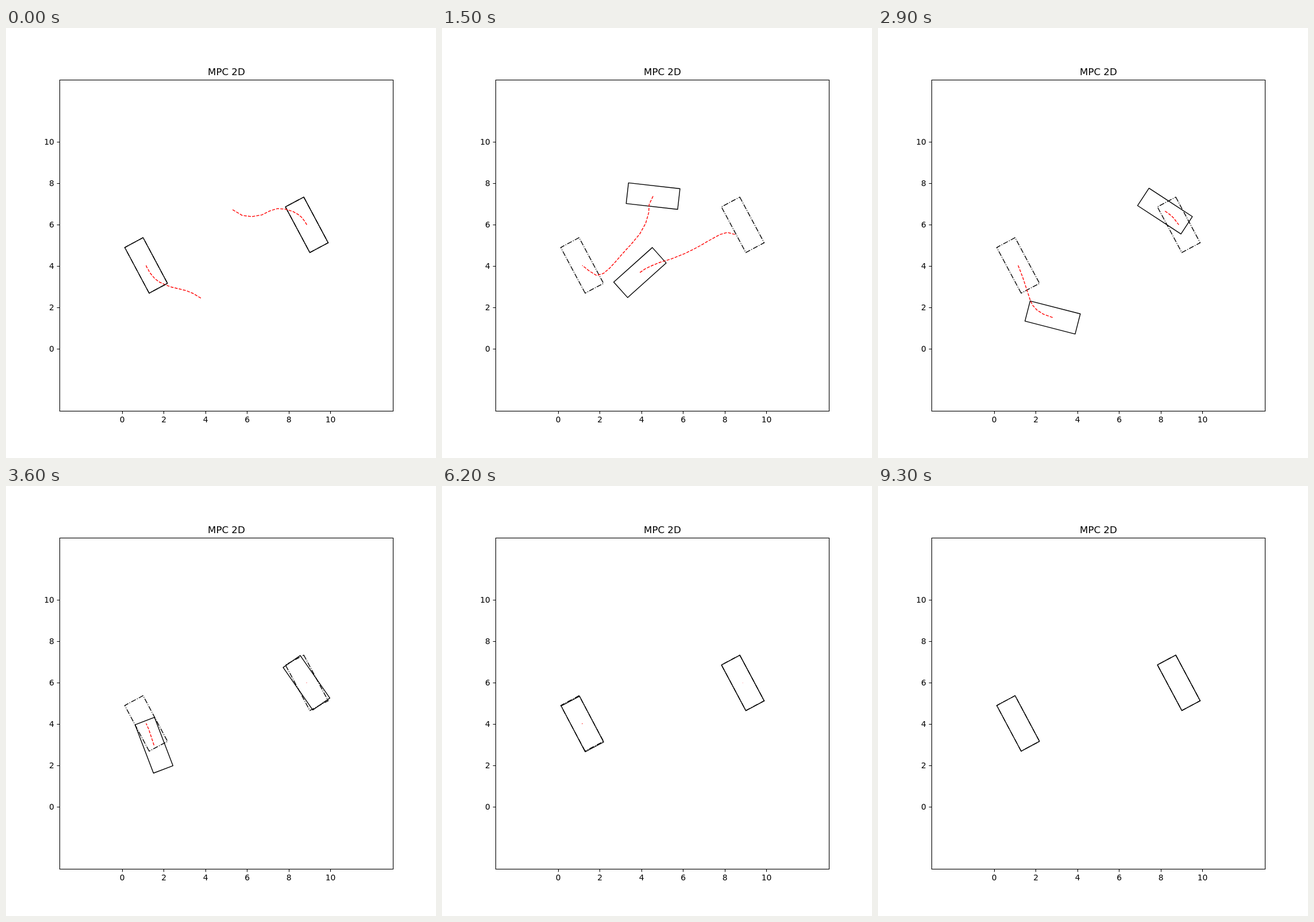
Animation of 748 by 748 pixels, one loop 10000 ms. Source, as an HTML page:

```html
<!DOCTYPE html>
<html lang="en">
<head>
<meta charset="utf-8">
<title>MPC 2D</title>
<style>
  html, body { margin: 0; width: 100%; height: 100%; overflow: hidden; background: #fff; }
  svg { display: block; width: 100vw; height: 100vh; }
  text { font: 13.89px "DejaVu Sans", sans-serif; fill: #000; text-anchor: middle; }
  .title { font-size: 16.67px; }
  .y { text-anchor: end; }
  .axis { fill: none; stroke: #000; stroke-width: 1.11; }
  .car, .goal, .plan { fill: none; stroke: #000; stroke-width: 1.39; stroke-linejoin: round; }
  .goal { stroke-dasharray: 8.89 2.22 1.39 2.22; }
  .plan { stroke: #f00; stroke-dasharray: 5.14 2.22; }
</style>
</head>
<body>
<svg viewBox="0 0 748 748">
  <text class="title" x="383.4" y="82">MPC 2D</text>
  <g id="ticks"></g>
  <rect class="axis" x="93.5" y="90.5" width="580" height="576"/>
  <g id="scene"></g>
</svg>
<script>
const STEP = 100, LOOP = 10000, N = 13;
const LENGTH = 90.1, WIDTH = 36.2;
const RAD = Math.PI / 180;

const add = (parent, tag, attrs, text = '') => {
  const el = document.createElementNS('http://www.w3.org/2000/svg', tag);
  for (const name in attrs) el.setAttribute(name, attrs[name]);
  el.textContent = text;
  return document.getElementById(parent).appendChild(el);
};
const mix = (a, b, u) => a + (b - a) * u;
const points = text => text.split(' ').map(pair => pair.split(',').map(Number));
const line = pts => 'M' + pts.map(p => p[0].toFixed(2) + ' ' + p[1].toFixed(2)).join('L');

function box({ x, y, a }) {
  const c = Math.cos(a * RAD), s = Math.sin(a * RAD);
  const corners = [[-1, -1], [1, -1], [1, 1], [-1, 1]].map(([i, j]) => {
    const l = i * LENGTH / 2, w = j * WIDTH / 2;
    return [x + l * c - w * s, y + l * s + w * c];
  });
  return line(corners) + 'Z';
}

// Waypoints: step, x, y, heading, speed per step, or a decay rate towards the next one.
// Plans: predicted path at a given step; from `follow` on, the plan is the track itself.
const cars = [
  {
    keys: [
      { k: 0, x: 243.75, y: 413, a: 61.9, v: .8 },
      { k: 9, x: 279.3, y: 447.5, a: 21.6, v: 11 },
      { k: 21, x: 403.8, y: 350.2, a: -58.5, v: 16 },
      { k: 29, x: 499.2, y: 318.5, a: 33.2, v: 10 },
      { k: 33, x: 516.5, y: 333.5, a: 54, v: 3.5 },
      { k: 38, x: 524.6, y: 345, a: 62.5, v: .1, decay: .9 },
      { k: 99, x: 523.25, y: 342.4, a: 61.9 }
    ],
    plans: [
      [0, points('244,413 245,416 247,419 250,425 254,430 259,436 267,442 278,447 289,451 302,454 314,457 326,462 339,470')],
      [9, points('279,447 288,451 301,454 315,455 345,451.5 376,441 392,432 406,421 421,407 437,394 456,382 478,376 500,377')]
    ],
    follow: 21, near: 33
  },
  {
    keys: [
      { k: 0, x: 523.25, y: 342.4, a: 241.9, v: .8 },
      { k: 9, x: 471.2, y: 312.4, a: 180.6, v: 14 },
      { k: 16, x: 345, y: 291, a: 181, v: 23 },
      { k: 21, x: 304.5, y: 373.8, a: 48.3, v: 24 },
      { k: 25, x: 364, y: 453, a: 90, v: 24 },
      { k: 29, x: 303.8, y: 503.6, a: 194.4, v: 19 },
      { k: 33, x: 265, y: 474, a: 251.8, v: 9, decay: .855 },
      { k: 45, x: 247.9, y: 421.9, a: 245.8, decay: .88 },
      { k: 99, x: 243.75, y: 413, a: 241.9 }
    ],
    plans: [
      [0, points('523,342 521,338.5 518,334 514,329 508,324 499,319 486,315 472,314 459,318 445,325 428,328 411,326 394,316')],
      [9, points('471,312 437,313.5 415,316 394,320.5 374,326 356,335 340,351 329,372 321,391 308,411 288,422 266,423 244,413')],
      [21, points('304,374 321,393 338,411 345,435 341,458 327,475 309,484 291,484 276,478 264,468 257,456 250,431 244,413')]
    ],
    follow: 29, near: 44
  }
];

function pose(keys, k) {
  const i = keys.findIndex((p, n) => n && k <= p.k);
  const p = keys[i - 1], q = keys[i], span = q.k - p.k;
  if (p.decay) {
    const u = (1 - p.decay ** (k - p.k)) / (1 - p.decay ** span);
    return { x: mix(p.x, q.x, u), y: mix(p.y, q.y, u), a: mix(p.a, q.a, u) };
  }
  const u = (k - p.k) / span;
  const axis = (name, fn) => {
    const from = p[name], to = q[name];
    const b = from + fn(p.a * RAD) * p.v * span / 3;
    const c = to - fn(q.a * RAD) * q.v * span / 3;
    const ab = mix(from, b, u), bc = mix(b, c, u), cd = mix(c, to, u);
    const l = mix(ab, bc, u), r = mix(bc, cd, u);
    return [mix(l, r, u), r - l];
  };
  const [x, dx] = axis('x', Math.cos), [y, dy] = axis('y', Math.sin);
  return { x, y, a: Math.atan2(dy, dx) / RAD };
}

function trackAhead({ keys, near }, k) {
  const pts = [], end = keys[keys.length - 1];
  for (let i = 0; i < N - 1; i++) {
    const p = pose(keys, Math.min(k + i, Math.max(k, near)));
    pts.push([p.x, p.y]);
  }
  return [...pts, [end.x, end.y]];
}

function plan(car, k, at) {
  if (k >= car.follow) return trackAhead(car, k);
  const i = car.plans.findIndex((p, n) => n && k < p[0]);
  const [k0, from] = car.plans[i - 1], [k1, to] = car.plans[i];
  const u = (k - k0) / (k1 - k0);
  const pts = from.map((p, j) => [mix(p[0], to[j][0], u), mix(p[1], to[j][1], u)]);
  const dx = at.x - pts[0][0], dy = at.y - pts[0][1];
  return pts.map(([x, y], j) => {
    const pull = 1 - j / (N - 1);
    return [x + dx * pull, y + dy * pull];
  });
}

for (let n = 0; n <= 10; n += 2) {
  const x = 202.25 + 36.23 * n, y = 558.5 - 36 * n, px = Math.floor(x) + .5;
  add('ticks', 'path', { class: 'axis', d: `M${px} 666.5v4.86M93.5 ${y}h-4.86` });
  add('ticks', 'text', { x, y: 685.7 }, n);
  add('ticks', 'text', { class: 'y', x: 83.8, y: y + 4.6 }, n);
}

for (const car of cars) {
  car.plans.push([car.follow, trackAhead(car, car.follow)]);
  add('scene', 'path', { class: 'goal', d: box(car.keys[car.keys.length - 1]).replace('Z', 'Z') });
  car.body = add('scene', 'path', { class: 'car' });
  car.route = add('scene', 'path', { class: 'plan' });
}

function draw(k) {
  for (const car of cars) {
    const at = pose(car.keys, k);
    car.body.setAttribute('d', box(at));
    car.route.setAttribute('d', line(plan(car, k, at)));
  }
}

let start, shown;
function tick(now) {
  start ??= now;
  const k = Math.floor((now - start) % LOOP / STEP);
  if (k !== shown) draw(shown = k);
  requestAnimationFrame(tick);
}
draw(0);
requestAnimationFrame(tick);
</script>
</body>
</html>
```
